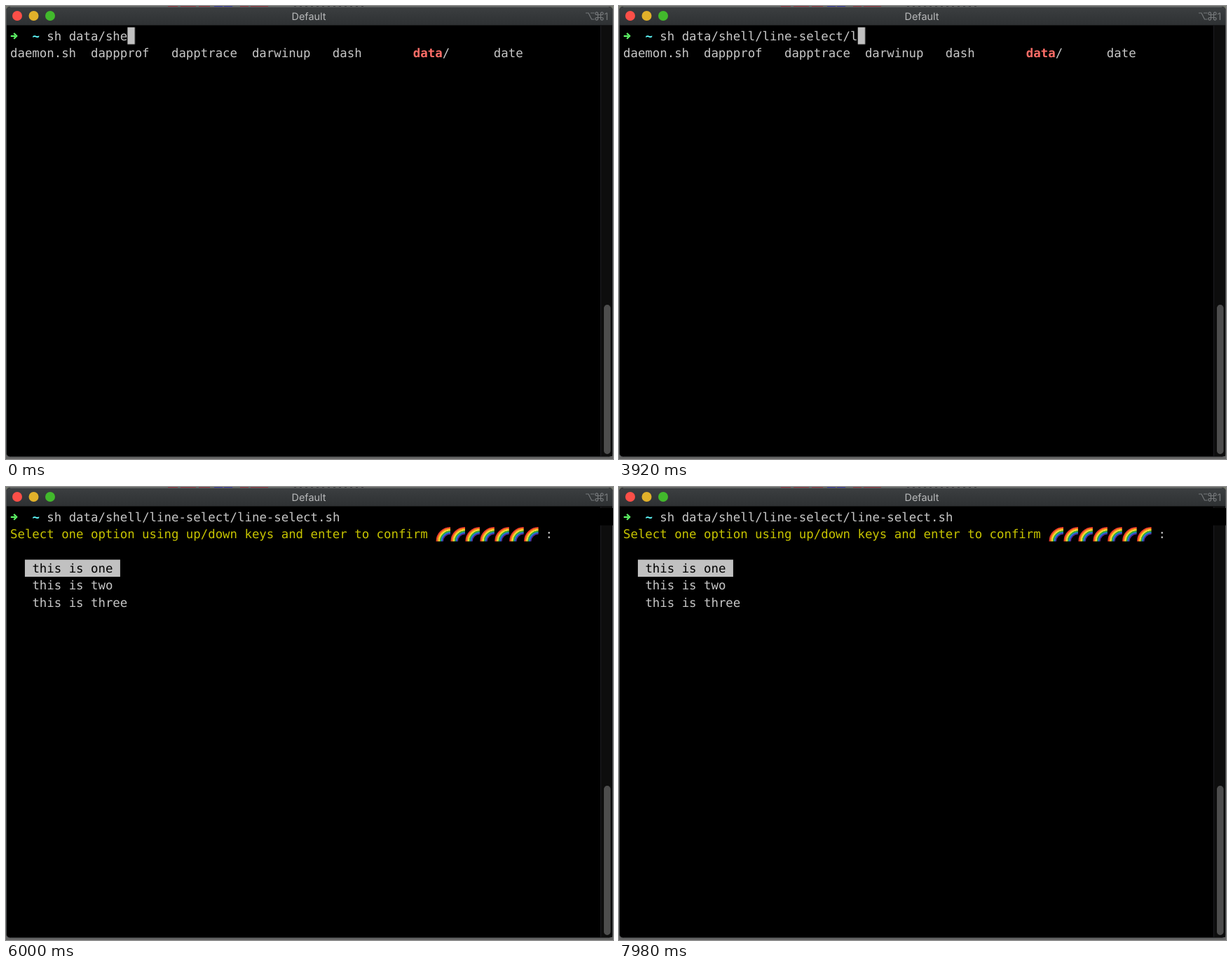
An HTML page for the animation above (8000 ms loop, 866x646 px).

```html
<!DOCTYPE html>
<html lang="en">
<head>
<meta charset="utf-8">
<title>Terminal</title>
<style>
  html, body { margin: 0; width: 100%; height: 100%; overflow: hidden; background: #000; }
  svg { display: block; width: 866px; height: 646px; }
  text { white-space: pre; text-rendering: geometricPrecision; }

  /* One cell is 10.46 x 24.4 px. */
  .term text { font: 17.374px "DejaVu Sans Mono", monospace; fill: #c7c7c7; }
  .term .bold { font-weight: 700; }
  .term .yellow { fill: #c7c400; }
  .term .red { fill: #ff6d67; font-weight: 700; }
  .term .cyan { fill: #60fdff; font-weight: 700; }
  .term .white { fill: #fff; font-weight: 700; }
  .term .dark { fill: #000; }
  .title { font: 14.4px Inter, sans-serif; fill: #b9babb; }

  .cursor, .slash, .before, .after { animation: 8s step-end infinite; }
  .cursor { animation-name: type; }
  .slash.one { animation-name: slash-one; }
  .slash.two { animation-name: slash-two; }
  .before { animation-name: before; }
  .after { animation-name: after; }

  @keyframes type {
    0%     { transform: translateX(calc(16 * 10.46px)); }
    3.25%  { transform: translateX(calc(19 * 10.46px)); }
    14.25% { transform: translateX(calc(20 * 10.46px)); }
    17.75% { transform: translateX(calc(21 * 10.46px)); }
    23%    { transform: translateX(calc(22 * 10.46px)); }
    29.5%  { transform: translateX(calc(31 * 10.46px)); }
    49%    { transform: translateX(calc(32 * 10.46px)); }
    51%    { transform: translateX(calc(33 * 10.46px)); }
    55.75%, 100% { transform: translateX(calc(46 * 10.46px)); }
  }
  @keyframes slash-one { 0%, 14.25%, 100% { opacity: 0; } 3.25% { opacity: 1; } }
  @keyframes slash-two { 0%, 49%, 100% { opacity: 0; } 29.5% { opacity: 1; } }
  @keyframes before { 0% { opacity: 1; } 71%, 100% { opacity: 0; } }
  @keyframes after { 0% { opacity: 0; } 71%, 100% { opacity: 1; } }
</style>
</head>
<body>
<svg viewBox="0 0 866 646">
  <defs>
    <linearGradient id="bar" x2="0" y2="1">
      <stop stop-color="#3c3f41"/>
      <stop offset="1" stop-color="#2e3133"/>
    </linearGradient>
    <g id="rainbow" fill="none" stroke-width="2">
      <path stroke="#f0392b" d="M1 20.5A19.5 19.5 0 0 1 20.5 1"/>
      <path stroke="#ff9a1f" d="M2.8 20.5A17.7 17.7 0 0 1 20.5 2.8"/>
      <path stroke="#ffe93b" d="M4.6 20.5A15.9 15.9 0 0 1 20.5 4.6"/>
      <path stroke="#35b43c" d="M6.4 20.5A14.1 14.1 0 0 1 20.5 6.4"/>
      <path stroke="#2277e6" d="M8.2 20.5A12.3 12.3 0 0 1 20.5 8.2"/>
      <path stroke="#5a2a96" stroke-width="1.4" d="M9.8 20.5A10.7 10.7 0 0 1 20.5 9.8"/>
    </g>
  </defs>

  <!-- desktop behind the window -->
  <rect width="866" height="646" fill="#777b6f"/>
  <rect y="640" width="866" height="6" fill="#666"/>
  <g stroke-width="2">
    <path stroke="#c8101c" d="M231 0H245M249 0H271M275 0H291M334 0H346M349 0H374"/>
    <path stroke="#1414dc" d="M297 0H309M311 0H323"/>
    <path stroke="#222" stroke-dasharray="3 5" d="M411 0H510"/>
  </g>

  <!-- window -->
  <rect x=".5" y="1" width="865" height="642" rx="5" fill="#000" stroke="#505254"/>
  <path fill="url(#bar)" d="M1 27V6Q1 1 6 1H860Q865 1 865 6V27Z"/>
  <path stroke="#5d6062" d="M6 1.5H860"/>
  <path stroke="#161718" d="M1 27.5H865"/>
  <circle cx="16" cy="14" r="7" fill="#fc4f48"/>
  <circle cx="39.5" cy="14" r="7" fill="#e1b12a"/>
  <circle cx="63" cy="14" r="7" fill="#42b92c"/>
  <text class="title" x="432" y="19.7" text-anchor="middle">Default</text>
  <g fill="none" stroke="#75787a" stroke-width="1.2">
    <path d="M827 10H831L835.5 19H839.5M834 10H839.5"/>
    <path d="M844.5 12.5V10.8A1.8 1.8 0 1 0 842.7 12.5H850.3A1.8 1.8 0 1 0 848.5 10.8V18.2A1.8 1.8 0 1 0 850.3 16.5H842.7A1.8 1.8 0 1 0 844.5 18.2Z"/>
  </g>
  <text class="title" x="853.5" y="19.7" style="fill:#75787a">1</text>

  <!-- scrollbar -->
  <rect x="848" y="28" width="17" height="614" fill="#0d0d0d"/>
  <path stroke="#1c1c22" d="M848.5 28V642"/>
  <rect x="853" y="426" width="9.5" height="213" rx="4.7" fill="#4d4d4d"/>

  <g class="term" transform="translate(6 30.4)">
    <path d="M.8 12.4H7M5.2 8.4L9.2 12.4L5.2 16.4" fill="none" stroke="#5ff967" stroke-width="2.2"/>
    <text class="cyan" x="31.38" y="18.4">~</text>
    <text x="52.3" y="18.4">sh data/shell/line-select/line-select.sh</text>
    <text class="slash one white" x="188.28" y="18.4">/</text>
    <text class="slash two white" x="313.8" y="18.4">/</text>
    <g class="cursor">
      <rect width="440" height="24.4" fill="#000"/>
      <rect class="before" width="10.46" height="24.2" fill="#c1c1c1"/>
    </g>

    <text class="before" y="42.8">daemon.sh  dappprof   dapptrace  darwinup   dash       <tspan class="red">data</tspan>/      date</text>

    <g class="after">
      <text class="yellow" y="42.8">Select one option using up/down keys and enter to confirm</text>
      <g transform="translate(607.5 26.6)">
        <use href="#rainbow"/>
        <use href="#rainbow" x="20.92"/>
        <use href="#rainbow" x="41.84"/>
        <use href="#rainbow" x="62.76"/>
        <use href="#rainbow" x="83.68"/>
        <use href="#rainbow" x="104.6"/>
        <use href="#rainbow" x="125.52"/>
      </g>
      <text x="763.58" y="42.8">:</text>
      <rect x="20.92" y="73.2" width="135.98" height="24.4" fill="#c1c1c1"/>
      <text class="dark" x="31.38" y="91.6">this is one</text>
      <text x="31.38" y="116">this is two</text>
      <text x="31.38" y="140.4">this is three</text>
    </g>
  </g>
</svg>
</body>
</html>
```
